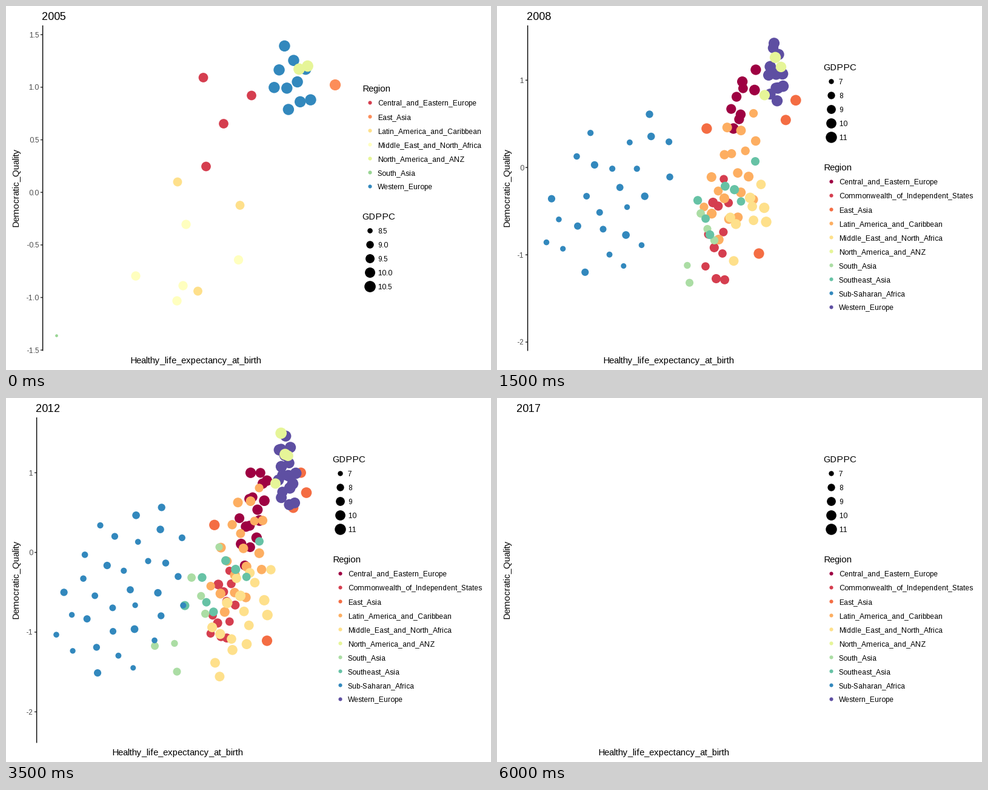
Write a matplotlib script that moves like this. It is 800x600 px and loops after 6.5 s.

```python
import math
import random

import matplotlib.pyplot as plt
import numpy as np
from matplotlib.animation import FuncAnimation

plt.rcParams["font.family"] = "Liberation Sans"
plt.rcParams["text.hinting_factor"] = 1

W, H, DPI = 800, 600, 100
PT = 72 / DPI  # points per pixel
GOLDEN = math.pi * (3 - math.sqrt(5))
AXIS_YEARS = (2006, 2008, 2011, 2013, 2015)
AXIS_ZERO = (269.8, 266.2, 255.4, 253.7, 245.2)
AXIS_UNIT = (142.2, 143.9, 134.3, 128.5, 122)

COLORS = {
    "Central_and_Eastern_Europe": "#9e0142",
    "Commonwealth_of_Independent_States": "#d53e4f",
    "East_Asia": "#f46d43",
    "Latin_America_and_Caribbean": "#fdae61",
    "Middle_East_and_North_Africa": "#fee08b",
    "North_America_and_ANZ": "#e6f598",
    "South_Asia": "#abdda4",
    "Southeast_Asia": "#66c2a5",
    "Sub-Saharan_Africa": "#3288bd",
    "Western_Europe": "#5e4fa2",
}
FIRST_COLORS = {
    "Central_and_Eastern_Europe": "#d53e4f",
    "East_Asia": "#fc8d59",
    "Latin_America_and_Caribbean": "#fee08b",
    "Middle_East_and_North_Africa": "#ffffbf",
    "North_America_and_ANZ": "#e6f598",
    "South_Asia": "#99d594",
    "Western_Europe": "#3288bd",
}

fig = plt.figure(figsize=(W / DPI, H / DPI), dpi=DPI, facecolor="white")
ax = fig.add_axes([0, 0, 1, 1])


def radius(share):
    """Dot radius whose area follows a value's share of its range."""
    return 0.94 + 1.4226 * (1 + 5 * math.sqrt(max(share, 0)))


def spiral(k, n, cx, cy, rx, ry, slope):
    """Dot k of n spread evenly over a sheared ellipse."""
    d = math.sqrt((k + 0.5) / n)
    dx = rx * d * math.cos(k * GOLDEN)
    return cx + dx, cy + slope * dx + ry * d * math.sin(k * GOLDEN)


class Region:
    """Countries drifting from one cloud to another as more of them join."""

    def __init__(self, name, counts, wealth, slope=0, early=None, late=None, spots=None):
        self.color = COLORS[name]
        self.counts, self.slope, self.spots = counts, slope, spots
        self.early, self.late = early, late
        rng = random.Random(name)
        n = counts[1]
        self.rank = rng.sample(range(n), n)
        self.radii = [radius(wealth + rng.uniform(-0.12, 0.12)) for _ in range(n)]
        self.phase = [rng.uniform(0, 2 * math.pi) for _ in range(n)]

    def rows(self, year):
        n = self.counts[1]
        present = round(np.interp(year, (2006, 2011), self.counts))
        u = min((year - 2006) / 6, 1)
        for k in range(n):
            if self.rank[k] >= present:
                continue
            if self.spots:
                x, y = self.spots[k]
            else:
                cloud = [a + (b - a) * u for a, b in zip(self.early, self.late)]
                x, y = spiral(k, n, *cloud, self.slope)
            sway = 0.5 * (year - 2006) + self.phase[k]
            x += 2.5 * math.sin(sway)
            y += 5 * math.cos(sway)
            yield min(max(x, 71.8), 495.5), min(max(y, 56.5), 543.5), self.radii[k], self.color


# Clouds are (centre x, centre y, half width, half height).
REGIONS = [
    Region("East_Asia", (4, 5), 0.74,
           spots=[(474, 186), (484, 122), (430, 405), (495, 153), (346, 207)]),
    Region("Central_and_Eastern_Europe", (5, 16), 0.71, -1.8,
           early=(404, 142, 24, 25), late=(408, 190, 27, 70)),
    Region("Commonwealth_of_Independent_States", (11, 12), 0.5, -0.9,
           early=(370, 390, 24, 105), late=(358, 345, 28, 65)),
    Region("Latin_America_and_Caribbean", (19, 19), 0.55, -1,
           early=(388, 300, 48, 105), late=(386, 258, 48, 105)),
    Region("Middle_East_and_North_Africa", (4, 17), 0.68, -1.2,
           early=(428, 335, 34, 70), late=(385, 362, 58, 75)),
    Region("South_Asia", (4, 7), 0.32, -1.2,
           early=(350, 395, 45, 60), late=(300, 350, 72, 80)),
    Region("Southeast_Asia", (7, 8), 0.46, -0.8,
           early=(375, 335, 80, 35), late=(360, 300, 85, 45)),
    Region("Sub-Saharan_Africa", (22, 33), 0.2, -0.4,
           early=(188, 305, 118, 135), late=(192, 318, 118, 135)),
    Region("Western_Europe", (8, 17), 0.88, 0.8,
           early=(460, 102, 13, 48), late=(461, 122, 17, 62)),
    Region("North_America_and_ANZ", (2, 4), 0.87,
           spots=[(442, 142), (461, 88), (456, 60), (466, 100)]),
]

FIRST_SPOTS = {
    "Central_and_Eastern_Europe": (
        0.6, [(325.5, 118), (405, 147.5), (359, 194), (330, 264.5)]),
    "East_Asia": (0.9, [(543, 130)]),
    "Latin_America_and_Caribbean": (
        0.5, [(283, 290), (386, 328.5), (316.5, 470)]),
    "Middle_East_and_North_Africa": (
        0.55, [(297, 360), (383.5, 418.5), (214, 445), (292, 461), (282, 486)]),
    "South_Asia": (0, [(83.5, 543.5)]),
    "Western_Europe": (
        0.93, [spiral(k, 10, 473, 122, 34, 66, 0.4) for k in range(10)]),
    "North_America_and_ANZ": (0.97, [(483.5, 104), (497.5, 99)]),
}


def text(x, y, s, size, color="black", **kw):
    ax.text(x, y, s, fontsize=size * PT, color=color, **kw)


def line(xs, ys, color):
    ax.plot(xs, ys, color=color, lw=1.42 * PT, solid_capstyle="butt", snap=False)


def dots(rows):
    """Draw (x, y, radius, colour) rows in order."""
    x, y, r, c = zip(*rows)
    ax.scatter(x, y, s=(2 * PT * np.array(r)) ** 2, c=c, linewidths=0)


def legend(x, y, title, entries):
    """Title over rows of (label, radius, colour)."""
    text(x, y, title, 15)
    for i, (label, r, color) in enumerate(entries):
        row = y + 18 + 23.04 * i
        dots([(x + 13, row, r, color)])
        text(x + 26, round(row + 5), label, 12)


def size_legend(x, y, values, low, span, fmt):
    legend(x, y, "GDPPC",
           [(format(v, fmt), radius((v - low) / span), "black") for v in values])


def region_legend(x, y, colors):
    legend(x, y, "Region", [(name, 3.07, c) for name, c in colors.items()])


def frame_text(year, left, label_x):
    text(left, 23, str(year), 18)
    text(label_x, 589, "Healthy_life_expectancy_at_birth", 15)
    text(20, 299, "Democratic_Quality", 15, rotation=90,
         rotation_mode="anchor", ha="center", va="baseline")


def y_axis(x, zero, unit, values, fmt):
    for v in values:
        y = zero - v * unit
        if 32 < y < 568:
            line([x - 3.67, x], [y, y], "#333333")
            text(x - 6.6, y + 4.5, format(v, fmt), 12, "#4d4d4d", ha="right")
    line([x, x], [32, 568.5], "black")


def draw_first():
    frame_text(2005, 59, 204)
    y_axis(60.6, 307.2, 173.3, np.arange(1.5, -1.6, -0.5), ".1f")
    dots([(*spot, radius(wealth), FIRST_COLORS[name])
          for name, (wealth, spots) in FIRST_SPOTS.items() for spot in spots])
    region_legend(587, 141, FIRST_COLORS)
    size_legend(587, 352, np.arange(8.5, 10.6, 0.5), 8.33, 2.27, ".1f")


def draw_year(year):
    if year == 2017:
        frame_text(year, 32, 166)
    else:
        frame_text(year, 49, 174)
        y_axis(50.6, np.interp(year, AXIS_YEARS, AXIS_ZERO),
               np.interp(year, AXIS_YEARS, AXIS_UNIT), (1, 0, -1, -2), "d")
        dots([row for region in REGIONS for row in region.rows(year)])
    size_legend(538, 106, range(7, 12), 6.69, 4.66, "d")
    region_legend(538, 271, COLORS)


def update(i):
    ax.cla()
    ax.set(xlim=(0, W), ylim=(H, 0))
    ax.axis("off")
    if i == 0:
        draw_first()
    else:
        draw_year(2005 + i)
    return []


anim = FuncAnimation(fig, update, frames=13, interval=500, repeat=True,
                     repeat_delay=0, init_func=lambda: [], blit=False)
plt.show()
```
